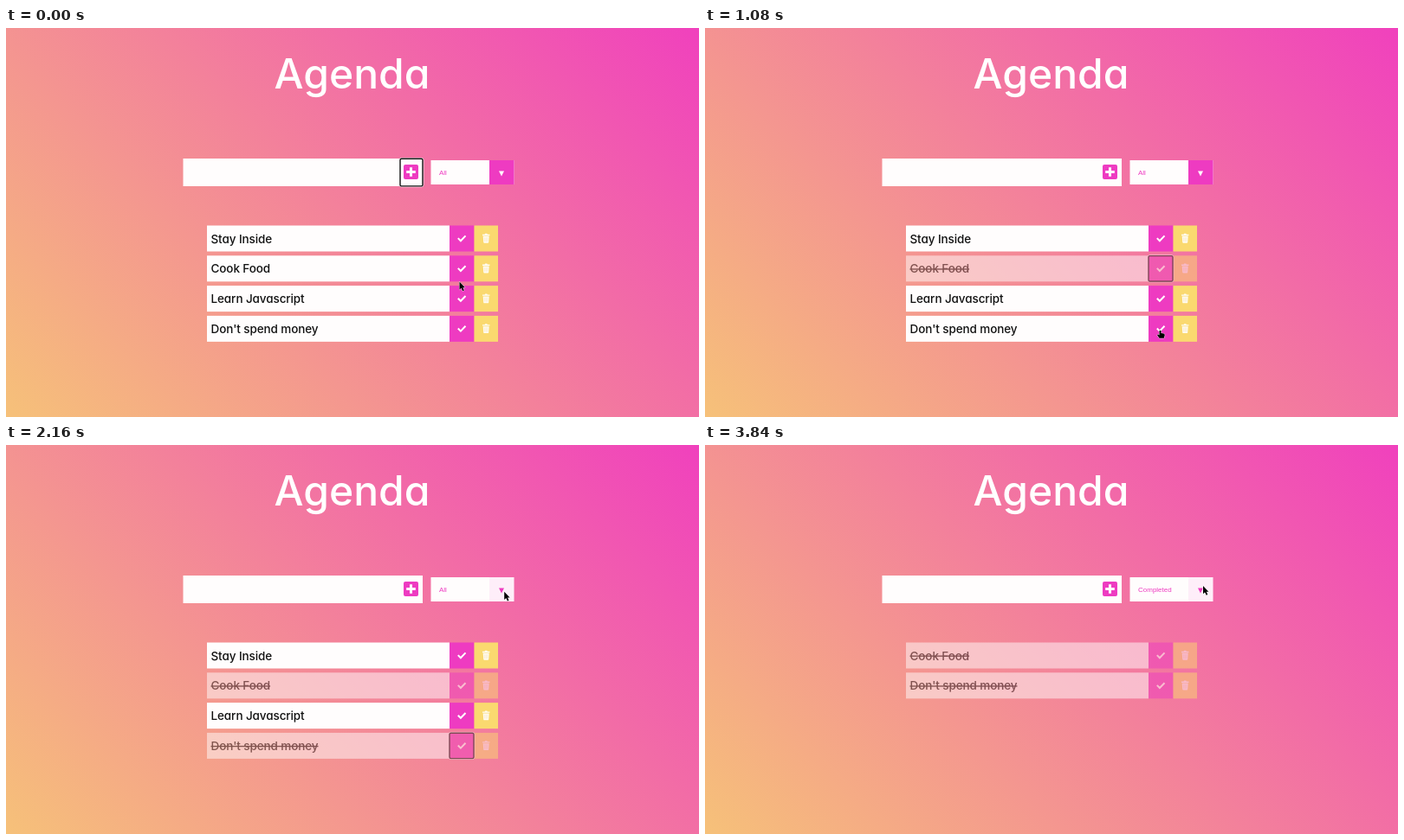
An HTML page for the animation above (3.88 s loop, 800x450 px).

```html
<!DOCTYPE html>
<html lang="en">
<head>
<meta charset="utf-8">
<title>Agenda</title>
<style>
  html, body { margin: 0; width: 100%; height: 100%; overflow: hidden; }
  body { background: linear-gradient(45deg, #f6c179, #f041bd); }
  svg { display: block; width: 800px; height: 450px; }
  text { white-space: pre; }
  .geo { font-family: Inter, sans-serif; font-weight: 500; font-feature-settings: "cv11"; }
  .title { font-size: 48px; fill: #fff; text-anchor: middle; }
  .task { font-size: 13.5px; letter-spacing: -.1px; fill: #111; }
  .option { font: 8px "Liberation Sans", Arial, sans-serif; }
  .popup { filter: drop-shadow(0 2px 2px #0006); }
</style>
</head>
<body>
<svg viewBox="0 0 800 450"></svg>
<script>
const LOOP = 3880, PINK = '#ee3bc1', YELLOW = '#fad96f', WHITE = '#fffdfd';
const svg = document.querySelector('svg');
const tasks = [
  { name: 'Stay Inside', doneAt: Infinity },
  { name: 'Cook Food', doneAt: 260 },
  { name: 'Learn Javascript', doneAt: Infinity },
  { name: "Don't spend money", doneAt: 1180 }
];
const options = ['All', 'Completed', 'Uncompleted'];
const popupTimes = [[2360, 2760], [3120, 3440]];
const hoverTimes = [[1960, 2760], [2920, 3440], [3640, LOOP]];
// Pointer stops: time, x, y
const stops = [
  [0, 523.5, 293.5], [160, 526, 276], [560, 526, 275.5], [920, 525.5, 350],
  [1500, 525.5, 350], [2060, 575, 170], [2400, 576, 168.5], [2640, 547.5, 205],
  [2760, 547.5, 205], [3020, 574, 167], [3160, 574, 167], [3360, 542, 197],
  [3480, 542, 197], [3740, 575, 163], [LOOP, 575, 163]
];

const clamp = (v, lo = 0, hi = 1) => Math.min(hi, Math.max(lo, v));
const within = (t, spans) => spans.some(([from, to]) => t >= from && t < to);

// CSS "ease" timing: cubic-bezier(.25, .1, .25, 1)
function ease(x) {
  const curve = (s, a, b) => 3 * a * s * (1 - s) ** 2 + 3 * b * s * s * (1 - s) + s ** 3;
  let lo = 0, hi = 1;
  for (let i = 0; i < 20; i++) {
    const mid = (lo + hi) / 2;
    if (curve(mid, .25, .25) < clamp(x)) lo = mid; else hi = mid;
  }
  return curve(lo, .1, 1);
}

function pointerAt(t) {
  const i = Math.max(1, stops.findIndex(s => s[0] > t));
  const [t0, x0, y0] = stops[i - 1], [t1, x1, y1] = stops[i];
  const p = (t - t0) / (t1 - t0), k = p * p * (3 - 2 * p);
  return [x0 + (x1 - x0) * k, y0 + (y1 - y0) * k];
}

const rect = (x, y, w, h, fill, extra = '') =>
  `<rect x="${x}" y="${y}" width="${w}" height="${h}" fill="${fill}" ${extra}/>`;
const label = (x, y, text, fill) =>
  `<text class="option" x="${x}" y="${y}" fill="${fill}">${text}</text>`;
const focusRing = (x, y, w, h) =>
  rect(x - .8, y - .8, w + 1.6, h + 1.6, 'none', 'rx="2" stroke="#fff" stroke-width="1"') +
  rect(x, y, w, h, 'none', 'rx="1.5" stroke="#111" stroke-width="1.4"');

function inputBar(focused) {
  return rect(204.5, 151, 276.5, 32, WHITE) +
    rect(459, 158, 17, 17, PINK, 'rx="2"') +
    '<path d="M467.5 161.2v10.6M462.2 166.5h10.6" stroke="#fff" stroke-width="3"/>' +
    (focused ? focusRing(455, 151.3, 26, 31.6) : '');
}

function selectBox(t, choice) {
  let hover = 0;
  for (const [from, to] of hoverTimes)
    if (t >= from) hover = t < to ? ease((t - from) / 300) : 1 - ease((t - to) / 300);
  return rect(490.5, 153, 96, 28, WHITE) +
    rect(558, 153, 28.5, 28, PINK, `opacity="${1 - hover}"`) +
    label(500, 170, choice, PINK) +
    `<path d="M569 165.5h6l-3 6z" fill="${hover > .5 ? PINK : '#fff'}"/>`;
}

function popup(y, choice) {
  const active = y > 181.5 ? clamp(Math.floor((y - 181.5) / 10), 0, 2) : options.indexOf(choice);
  return '<g class="popup">' +
    rect(491, 181.3, 95.5, 31, '#fff', 'stroke="#777" stroke-width=".6"') + '</g>' +
    rect(491, 182 + active * 10, 95.5, 10.2, '#0b9ae8') +
    options.map((o, i) => label(501, 189.2 + i * 10, o, i === active ? '#fff' : PINK)).join('');
}

function taskRow(task, y, t, focused) {
  const done = t >= task.doneAt;
  const opacity = done ? 1 - .5 * ease((t - task.doneAt) / 500) : 1;
  const style = done ? 'style="text-decoration:line-through"' : '';
  return `<g transform="translate(0 ${y})" opacity="${opacity}">` +
    rect(232, 0, 280, 30, WHITE) + rect(512, 0, 28.5, 30, PINK) + rect(540.5, 0, 27.5, 30, YELLOW) +
    `<text class="geo task" x="236.5" y="20" ${style}>${task.name}</text>` +
    '<path d="M521.8 14.6l3.1 3.1 5.6-5.8" fill="none" stroke="#fff" stroke-width="2"/>' +
    '<path d="M550 10.3h2.4l.8-1h2l.8 1h2.4v1.4H550zM550.7 12.3h7l-.5 7q-.1 .9-1 .9h-4q-.9 0-1-.9z" fill="#fff" opacity=".9"/>' +
    '<path d="M552.6 13.6v5M554.2 13.6v5M555.8 13.6v5" stroke="#f5dfae" stroke-width=".5"/>' +
    (focused ? focusRing(512, .3, 28, 29.4) : '') + '</g>';
}

function pointer(x, y, hand) {
  const shape = hand
    ? 'M-1 .2Q0-.8 1 .2V3L4 3.6Q5.4 4 5.2 5.5L4.3 8.8H-1L-3.3 5.6Q-3.4 4.3-2.3 4.5L-1 5.5z'
    : 'M0 0V9.2L2.1 7.3 3.7 10.8 5.3 10 3.8 6.7H6.4z';
  return `<path transform="translate(${x} ${y})" d="${shape}" fill="#000" stroke="#fff" stroke-width=".8" stroke-linejoin="round" paint-order="stroke"/>`;
}

function draw(t) {
  const [x, y] = pointerAt(t);
  const choice = t < 2760 ? 'All' : t < 3440 ? 'Uncompleted' : 'Completed';
  const focus = t < 220 ? 'add' : t < 1160 ? tasks[1] : t < 2360 ? tasks[3] : null;
  const shown = tasks.filter(k => choice === 'All' || (t >= k.doneAt) === (choice === 'Completed'));
  const rowY = i => 228.5 + i * 34.8;
  const hand = x > 512 && x < 568 && shown.some((_, i) => y > rowY(i) && y < rowY(i) + 30);
  svg.innerHTML = '<text class="geo title" x="399.5" y="70">Agenda</text>' +
    inputBar(focus === 'add') + selectBox(t, choice) +
    shown.map((k, i) => taskRow(k, rowY(i), t, k === focus)).join('') +
    (within(t, popupTimes) ? popup(y, choice) : '') + pointer(x, y, hand);
}

function tick() {
  draw(performance.now() % LOOP);
  requestAnimationFrame(tick);
}
tick();
</script>
</body>
</html>
```
